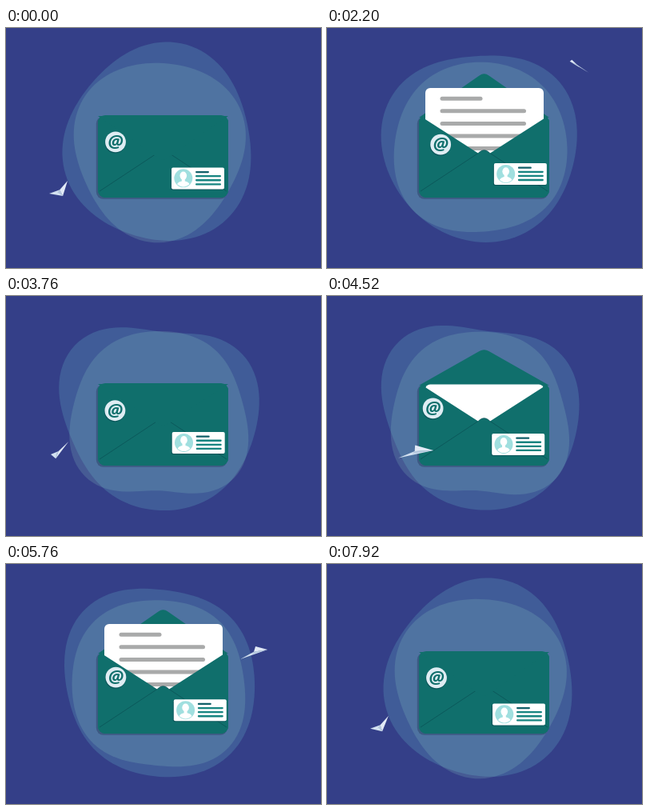
Animation, 394 px wide and 300 px high, one loop 7.96 s. Source, as an HTML page with a canvas:

```html
<!DOCTYPE html>
<html lang="en">
<head>
<meta charset="utf-8">
<title>Envelope and paper plane</title>
<style>
html, body { margin: 0; width: 100%; height: 100%; overflow: hidden; background: #343f88; }
canvas { display: block; width: 394px; height: 300px; }
</style>
</head>
<body>
<canvas id="stage" width="394" height="300"></canvas>
<script>
const ctx = document.getElementById('stage').getContext('2d');
const LOOP = 7960, CYCLE = LOOP / 2;
const GREEN = '#106f6c';

// Smooth periodic path through keys of the form [time, ...values]
function track(keys, period, t) {
  const n = keys.length;
  const time = k => keys[(k + n) % n][0] + period * Math.floor(k / n);
  let i = n - 1;
  while (i > 0 && keys[i][0] > t) i--;
  const span = time(i + 1) - time(i), u = (t - time(i)) / span, v = 1 - u;
  return keys[0].slice(1).map((_, c) => {
    const val = k => keys[(k + n) % n][c + 1];
    const slope = k => (val(k + 1) - val(k - 1)) / (time(k + 1) - time(k - 1));
    return val(i) * (1 + 2 * u) * v * v + slope(i) * span * u * v * v
      + val(i + 1) * u * u * (3 - 2 * u) - slope(i + 1) * span * u * u * v;
  });
}

const progress = (t, start, length) => Math.min(1, Math.max(0, (t - start) / length));
const cubic = p => p < .5 ? 4 * p ** 3 : 1 - 4 * (1 - p) ** 3;
const ease = p => { const q = 1 - (1 - p) ** 2; return q * q * (3 - 2 * q); };

function fillPath(color, draw) {
  ctx.beginPath();
  draw();
  ctx.fillStyle = color;
  ctx.fill();
}
const box = (color, x, y, w, h, r) => fillPath(color, () => ctx.roundRect(x, y, w, h, r));
const disc = (color, x, y, r) => fillPath(color, () => ctx.arc(x, y, r, 0, 7));
const poly = (color, ...points) => fillPath(color, () => points.forEach(p => ctx.lineTo(...p)));

// A circle whose radius follows radius(angle)
function blob(color, cx, cy, radius) {
  fillPath(color, () => {
    for (let a = 0; a < 2 * Math.PI; a += Math.PI / 60)
      ctx.lineTo(cx + radius(a) * Math.cos(a), cy + radius(a) * Math.sin(a));
  });
}

function blobs(t) {
  const { cos, sin, PI } = Math;
  const wave = (mean, swing, lag) => mean - swing * cos(2 * PI * t / LOOP - lag);
  blob('rgba(112,208,216,.2)', 192.2, wave(146.8, 1.4, 0), a => 120.5
    + wave(1, 4.3, -.25) * cos(2 * a) + wave(2.2, 3.5, .7) * sin(2 * a)
    + wave(-1.2, 3, .45) * cos(3 * a) + wave(-2.1, -6, -.2) * sin(3 * a)
    + wave(-1.8, -2, .4) * cos(4 * a));
  blob('rgba(139,202,192,.2)', 191.5, 150.5, a => 109
    + wave(1, 4, .15) * cos(2 * a) + wave(.6, 2.2, 1.3) * sin(2 * a)
    + wave(0, -1.3, .8) * cos(3 * a) + wave(.7, 6.3, 0) * sin(3 * a)
    + wave(-2.2, -2.6, .3) * cos(4 * a));
}

// time, nose x y, tail x y, roll (sideways reach of the wings)
const FLIGHT = [
  [0, 71, 210, 65.5, 199, -11.5],
  [200, 88, 208, 72, 202, -11.5],
  [540, 133, 193, 99.5, 194.5, -10.5],
  [1160, 259, 140, 234.5, 158, 11.5],
  [1780, 327, 107, 302.5, 111, -9.5],
  [2060, 320, 34, 322, 54, 9],
  [2400, 272, 74, 296, 58, 9],
  [2900, 175, 150, 200, 140, 9],
  [3240, 86, 186, 110, 184, 0],
  [3640, 62, 199, 72, 186, -10]
];

function plane(ph) {
  const [nx, ny, tx, ty, roll] = track(FLIGHT, CYCLE, ph);
  const nose = [nx, ny], left = [tx - roll, ty - 8], right = [tx + roll, ty + 8];
  const fold = [tx + (nx - tx) * .3, ty + (ny - ty) * .3];
  const keel = [fold[0] + roll * .25, fold[1] + 3];
  poly('#d3e1f0', nose, fold, right);
  poly('#e2eaf6', nose, left, fold);
  poly('#b4c7dd', nose, fold, keel);
}

function flap(k) {
  ctx.save();
  ctx.translate(196.5, 111);
  ctx.scale(1, -k);
  fillPath(GREEN, () => {
    ctx.moveTo(-81.5, -1);
    ctx.lineTo(-6, 51.5);
    ctx.quadraticCurveTo(0, 56, 6, 51.5);
    ctx.lineTo(81.5, -1);
  });
  ctx.restore();
}

function letter(ph) {
  const y = 110.5 - 35.5 * (cubic(progress(ph, 700, 306)) - cubic(progress(ph, 2890, 306)));
  box('#fff', 123, y, 148, 180 - y, 6);
  for (let i = 0; i < 5; i++) {
    const grown = progress(ph, 780 + i * 125, 125);
    if (grown) box('#a9aaaa', 141.5, y + 10.7 + i * 15.6, Math.max(5, (i ? 107.5 : 53) * grown), 5, 2.5);
  }
}

function pocket() {
  const peak = () => {
    ctx.lineTo(189, 156.5);
    ctx.quadraticCurveTo(196.5, 148.5, 204, 156.5);
  };
  ctx.save();
  ctx.beginPath();
  ctx.roundRect(115, 109, 163, 103, 9);
  ctx.clip();
  fillPath(GREEN, () => {
    ctx.moveTo(115, 109);
    peak();
    ctx.lineTo(278, 109);
    ctx.lineTo(278, 212);
    ctx.lineTo(115, 212);
  });
  ctx.beginPath();
  ctx.moveTo(117, 204);
  peak();
  ctx.lineTo(276, 204);
  ctx.strokeStyle = 'rgba(5,50,60,.45)';
  ctx.lineWidth = .8;
  ctx.stroke();
  ctx.restore();
}

// Slow drift of the two labels: time, x, y
const BADGE = [[0, 137, 142.4], [1160, 142.3, 144.6], [3080, 140.3, 145.6],
  [4520, 132.6, 140.4], [5760, 137.4, 141.6], [7000, 141.2, 137.4]];
const CARD = [[0, 207, 174.4], [1160, 207.8, 171.2], [3080, 209.2, 168.3],
  [4520, 206.2, 172], [5760, 209.8, 169.3], [7000, 207.2, 170.6]];

function badge(t) {
  ctx.save();
  ctx.translate(...track(BADGE, LOOP, t));
  disc('rgba(5,50,65,.4)', -.5, 1.2, 13);
  disc('#dfedf3', 0, 0, 12.9);
  ctx.font = 'italic bold 22px "Open Sans", sans-serif';
  ctx.textAlign = 'center';
  ctx.fillStyle = GREEN;
  ctx.fillText('@', 0, 6.4);
  ctx.restore();
}

function card(t) {
  ctx.save();
  ctx.translate(...track(CARD, LOOP, t));
  box('rgba(5,50,65,.4)', -1, 1, 66.5, 27, 2);
  box('#fff', 0, 0, 66, 27, 2);
  disc('#a0dfdf', 14.8, 13.4, 11.5);
  ctx.save();
  ctx.beginPath();
  ctx.arc(14.8, 13.4, 10.7, 0, 7);
  ctx.clip();
  fillPath('#fff', () => ctx.ellipse(14.8, 10.2, 4.3, 5.1, 0, 0, 7));
  box('#fff', 12.8, 13, 4, 5, 1);
  fillPath('#fff', () => ctx.ellipse(14.8, 22, 8, 5.2, 0, 0, 7));
  ctx.restore();
  for (let i = 0; i < 4; i++)
    box(i ? '#168480' : '#105f68', 30, 4.5 + i * 5.1, i ? 32 : 17, 2.3, 1.1);
  ctx.restore();
}

function render(t) {
  const ph = t % CYCLE;
  const open = 2 * (ease(progress(ph, 20, 920)) - cubic(progress(ph, 3230, 650))) - 1;
  const inFront = ph < 2000;

  ctx.fillStyle = '#343f88';
  ctx.fillRect(0, 0, 394, 300);
  blobs(t);
  if (!inFront) plane(ph);

  box('#3c5a82', 112.8, 110.5, 164, 103.3, 9);
  box(GREEN, 115, 109, 163, 103, 9);
  if (open > 0) flap(open);
  letter(ph);
  pocket();
  if (open <= 0) flap(open);
  badge(t);
  card(t);
  if (inFront) plane(ph);
}

const start = performance.now();
function tick() {
  render((performance.now() - start) % LOOP);
  requestAnimationFrame(tick);
}
tick();
</script>
</body>
</html>
```
